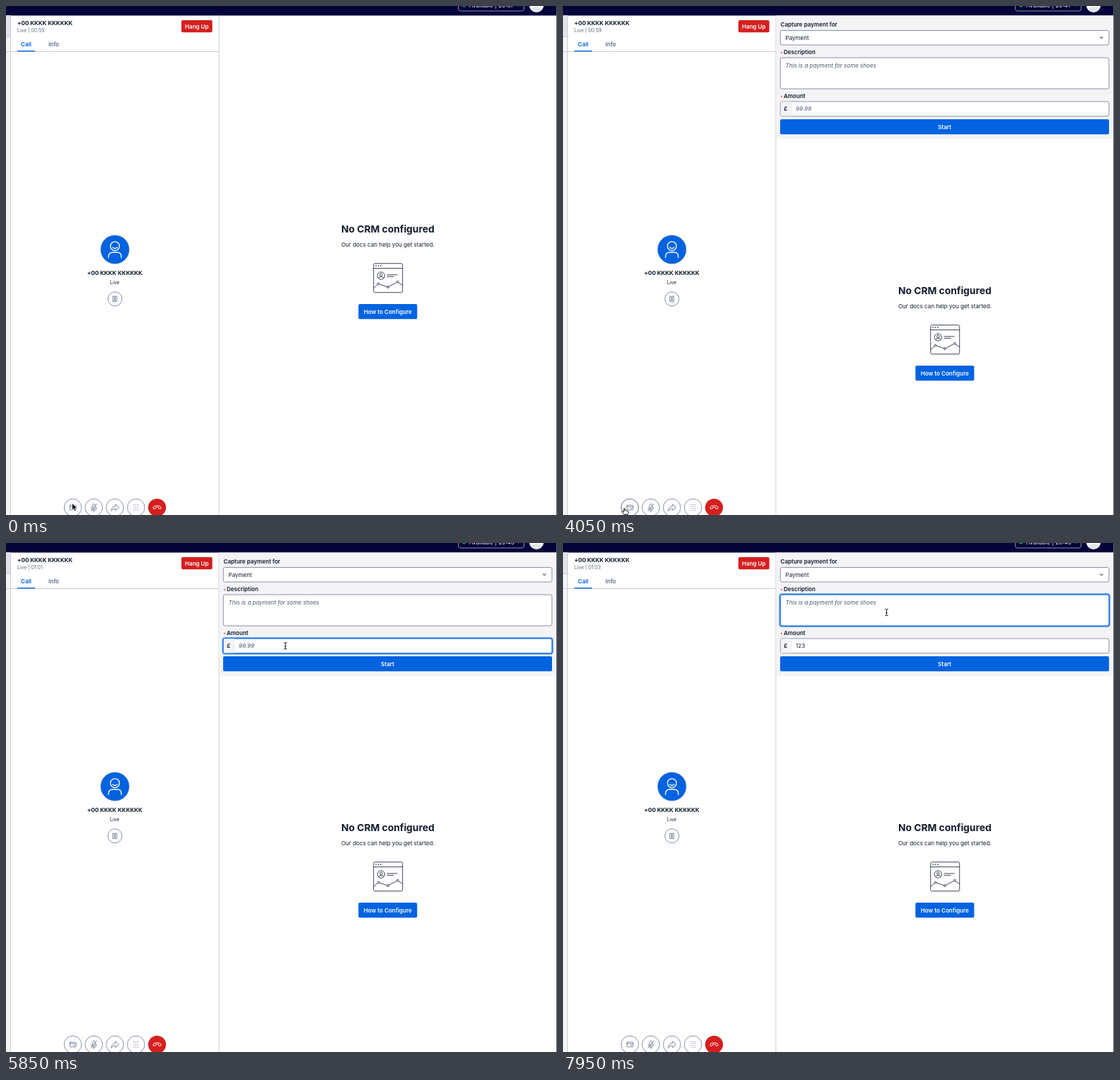
An HTML page that plays this animation: 779 by 719 pixels, repeating every 8000 ms.

```html
<!DOCTYPE html>
<html lang="en">
<head>
<meta charset="utf-8">
<title>Call payment form</title>
<style>
html, body { margin: 0; width: 100%; height: 100%; overflow: hidden; background: #fff; }
svg { display: block; width: 779px; height: 719px; }
text { font: 8.05px Inter, "Liberation Sans", sans-serif; fill: #121c2d; }
.b { font-weight: 600; }
.bb { font-weight: 700; }
.s { font-size: 6.9px; }
.w { fill: #fff; }
.m { text-anchor: middle; }
.ph { font-style: italic; fill: #4b5671; }
.line { stroke: #cacdd8; }
.ring { fill: #fff; stroke: #8891aa; }
.ico { fill: none; stroke: #606b85; stroke-width: .8; stroke-linecap: round; stroke-linejoin: round; }
.box { fill: #fff; stroke: #8891aa; }
.caret { stroke: #121c2d; stroke-width: .8; }
</style>
</head>
<body>
<svg viewBox="0 0 779 719">
  <rect width="779" height="719" fill="#fff"/>

  <!-- top bar -->
  <rect width="779" height="13.5" fill="#06033a"/>
  <rect x="639.5" y="-14" width="93" height="21" rx="3" fill="none" stroke="#8891aa"/>
  <circle cx="647.5" cy="-.8" r="2.4" fill="#14b053"/>
  <text id="status" class="w" x="655" y="1.7"></text>
  <path d="M722 -2l2.2 2.2 2.2-2.2" fill="none" stroke="#fff" stroke-width=".9"/>
  <circle cx="750" cy="-1.2" r="10.2" fill="#fff"/>
  <path d="M743 6q1-5 7-5t7 5q-7 5-14 0" fill="#e4e5ea"/>

  <!-- left strip and call panel -->
  <rect y="13.5" width="6.5" height="706" fill="#f4f4f6"/>
  <rect y="13.5" width="6.5" height="30" fill="#e1e3ea"/>
  <path class="line" d="M6.5 13.5V719M301 13.5V719M0 64.5H301M0 43.5H6"/>
  <text class="bb" x="16" y="27">+00 KKKK KKKKKK</text>
  <text id="call" class="s" x="16" y="36.7" style="fill:#606b85"></text>
  <rect x="248" y="20" width="43.7" height="17.3" rx="2" fill="#d61f1f"/>
  <text class="b w m" x="269.8" y="31.6">Hang Up</text>
  <text class="b m" x="28.5" y="56.8" style="fill:#0263e0">Call</text>
  <text class="b m" x="67.5" y="56.8" style="fill:#606b85">Info</text>
  <rect x="16" y="63" width="25" height="1.3" fill="#0263e0"/>

  <circle cx="154" cy="344" r="20" fill="#0263e0" stroke="#3a6fb8" stroke-width=".8"/>
  <g fill="none" stroke="#fff" stroke-width="1.3" stroke-linecap="round">
    <circle cx="154" cy="339.3" r="6.4"/>
    <path d="M150.8 341q3.2 3 6.4 0M145 355.5v-1.5q0-6 6-6h6q6 0 6 6v1.5"/>
  </g>
  <text class="bb m" x="153.8" y="380">+00 KKKK KKKKKK</text>
  <text class="s m" x="153.7" y="393.3">Live</text>
  <circle class="ring" cx="154" cy="413.8" r="10"/>
  <path class="ico" d="M151.3 410h1.8v7.6h-1.8zM154.9 410h1.8v7.6h-1.8z"/>

  <!-- call controls -->
  <circle id="pay" class="ring" cx="94.5" cy="708.5" r="12.3"/>
  <circle class="ring" cx="124.2" cy="708.5" r="12.3"/>
  <circle class="ring" cx="154" cy="708.5" r="12.3"/>
  <circle class="ring" cx="183.8" cy="708.5" r="12.3"/>
  <circle cx="213.6" cy="708.5" r="12.6" fill="#d61f1f"/>
  <g class="ico">
    <rect x="90.2" y="705.2" width="8.8" height="6.6" rx=".8"/>
    <path d="M90.2 707.3h8.8M95.5 709.8h2"/>
    <path d="M122.6 705.5q0-2.2 1.7-2.2t1.7 2.2v3q0 2.2-1.7 2.2t-1.7-2.2zM120.7 708q0 4.4 3.6 4.4t3.6-4.4M124.3 712.4v2M120.3 713.3l8-10"/>
    <path d="M148.8 713q.4-6.2 6-6.4v-2.8l5 4.5-5 4.5v-2.8q-4.200 0-6 3z"/>
  </g>
  <g id="dots" fill="#8891aa"></g>
  <path d="M208.200 709.500q-.8-1.800 1.200-2.800 4.200-2 8.400 0 2 1 1.200 2.800l-.5 1-2.700-.7-.4-1.700q-1.800-.5-3.600 0l-.4 1.700-2.700.7z" fill="none" stroke="#fff" stroke-width=".9" stroke-linejoin="round"/>

  <!-- empty CRM notice -->
  <g id="crm">
    <text class="bb m" x="539.8" y="320" style="font-size:13.8px">No CRM configured</text>
    <text class="m" x="539.8" y="340">Our docs can help you get started.</text>
    <g fill="none" stroke="#2b3448" stroke-width=".9" stroke-linejoin="round">
      <rect x="519.700" y="363.700" width="41" height="41" rx="2"/>
      <path d="M519.700 370.500h41M538.500 379.800h15M538.500 382.300h10"/>
      <path d="M522.400 367h1.500M525.700 367h1.500M529 367h1.500" stroke-width="1.400"/>
      <circle cx="530.300" cy="381" r="5.200"/>
      <circle cx="530.300" cy="379.700" r="1.800"/>
      <path d="M526.800 384.700q.5-2.300 3.500-2.300t3.500 2.300M519.700 398.500l5.500-5M527.700 393l11 3.600M541.300 396.300l11.200-6M555 390.700l5.700 3.800"/>
      <circle cx="526.400" cy="392.500" r="1.400"/>
      <circle cx="540" cy="397" r="1.400"/>
      <circle cx="553.800" cy="389.700" r="1.400"/>
    </g>
    <rect x="498.300" y="421" width="83" height="21.300" rx="2" fill="#0263e0"/>
    <text class="b w m" x="539.800" y="434.600">How to Configure</text>
  </g>

  <!-- payment form -->
  <g id="form">
    <rect x="301.500" y="13.500" width="477" height="174.500" fill="#f4f4f6"/>
    <text class="b" x="307.500" y="29.400">Capture payment for</text>
    <text class="b" x="312" y="68.200">Description</text>
    <text class="b" x="312" y="130.200">Amount</text>
    <circle cx="308.900" cy="65.700" r=".9" fill="#d61f1f"/>
    <circle cx="308.900" cy="127.700" r=".9" fill="#d61f1f"/>
    <g id="boxes"></g>
    <path d="M307.800 135.300h14.700v20h-14.700z" fill="#f4f4f6"/>
    <path d="M322.500 135.300v20" stroke="#e1e3ea" stroke-width=".6"/>
    <text class="b" x="312.200" y="148.200">£</text>
    <text x="314.500" y="47.600">Payment</text>
    <path d="M759 43.500l2.200 2.200 2.200-2.200" fill="none" stroke="#606b85" stroke-width="1.100"/>
    <text class="ph" x="314.500" y="86.700">This is a payment for some shoes</text>
    <text id="amount" x="329" y="148.300"></text>
    <path id="caret" class="caret"/>
    <rect x="307" y="160" width="465" height="21.300" rx="2" fill="#0263e0"/>
    <text class="b w m" x="539.500" y="173.500">Start</text>
  </g>

  <path d="M778.500 0V719" stroke="#5d6275"/>

  <!-- pointers -->
  <g id="arrow"><path d="M0 0v9.300l2.100-2 1.500 3.400 1.700-.7-1.500-3.300h3z" stroke="#fff" stroke-width=".6"/></g>
  <g id="hand"><path d="M-1.800 4.500l-2.300-3.200q-.7-1.300.5-1.500l1.600 1.200v-4.600q.9-1.200 1.700 0v2.800q1-.8 1.600.2 1.100-.6 1.600.4 1.300-.3 1.400.9v2l-.8 2.200z" fill="#fff" stroke="#000" stroke-width=".9" stroke-linejoin="round"/></g>
  <g id="beam"><path d="M-2.300-4.700q2.300 0 2.300 1.200q0-1.200 2.300-1.200M0-3.500v7M-2.300 4.700q2.300 0 2.300-1.200q0 1.200 2.300 1.200M-1.200.8h2.400" fill="none" stroke="#000" stroke-width=".9"/></g>
</svg>
<script>
const $ = id => document.getElementById(id);
const show = (el, on) => { el.style.display = on ? '' : 'none'; };

const LOOP = 8000, STEP = 150, SHIFT = 87;
const fields = [{ y: 34.5, h: 20.5 }, { y: 73, h: 44 }, { y: 135, h: 20.7 }];
const [, DESC, AMOUNT] = [0, 1, 2];

// time, x, y of the pointer
const path = [
  [0, 93.5, 702.5], [1800, 93.5, 702.5], [1950, 126.5, 531], [2100, 129, 529.5], [2850, 129, 529.5],
  [3000, 128.5, 528.8], [3300, 128.5, 528.8], [3450, 119, 595], [3600, 103, 670], [3750, 91, 706],
  [3900, 88, 713.7], [4200, 88, 713.7], [4350, 112, 668], [4650, 300, 330], [4800, 375, 180],
  [4950, 395, 145.3], [6750, 395, 145.3], [7050, 552.3, 47], [7200, 540, 56], [7350, 465, 94],
  [7500, 457.4, 98]
];

const make = (tag, parent, attrs) => {
  const el = document.createElementNS('http://www.w3.org/2000/svg', tag);
  for (const k in attrs) el.setAttribute(k, attrs[k]);
  return parent.appendChild(el);
};

for (const f of fields) {
  const shape = { x: 307.3, y: f.y, width: 464.6, height: f.h, rx: 2.3 };
  f.halo = make('rect', $('boxes'), { ...shape, fill: 'none', stroke: '#0263e0', 'stroke-opacity': .7, 'stroke-width': 3.6 });
  f.box = make('rect', $('boxes'), { ...shape, class: 'box' });
}
for (let i = 0; i < 12; i++)
  make('circle', $('dots'), { cx: 181 + i % 3 * 2.8, cy: 704.5 + (i / 3 | 0) * 2.7, r: .65 });

function pointer(t) {
  const i = path.findIndex(p => p[0] > t);
  if (i < 0) return path.at(-1).slice(1);
  const [a, b] = [path[i - 1], path[i]];
  const k = (t - a[0]) / (b[0] - a[0]);
  return [1, 2].map(n => a[n] + (b[n] - a[n]) * k);
}

const two = n => String(n).padStart(2, '0');
const clock = s => two(s / 60 | 0) + ':' + two(s % 60);

function draw(t) {
  const open = t >= 4050;
  $('status').textContent = 'Available | ' + clock(1237 + Math.floor((t + 750) / 1000));
  $('call').textContent = 'Live | ' + clock(55 + Math.floor((t + 350) / 1000));
  $('crm').setAttribute('transform', `translate(0 ${open ? SHIFT : 0})`);
  show($('form'), open);

  const [x, y] = pointer(t);
  const onPay = t > 3000 && Math.hypot(x - 94.5, y - 708.5) < 12.5;
  $('pay').style.fill = onPay && !open ? '#ebf4ff' : '#fff';
  $('pay').style.stroke = onPay ? '#606b85' : '';

  // form fields
  const focus = t < 5250 ? -1 : t < 7350 ? AMOUNT : DESC;
  const ringed = t >= 5400 && t !== 7350 ? focus : -1;
  let onField = false;
  fields.forEach((f, i) => {
    const over = open && x > 307 && y > f.y && y < f.y + f.h;
    onField ||= over;
    show(f.halo, i === ringed);
    f.box.style.stroke = i === ringed ? '#0263e0' : over || i === focus ? '#2a2a80' : '';
  });

  const typed = t < 6300 ? '' : t < 6450 ? '1' : '123';
  $('amount').textContent = typed || '99.99';
  $('amount').setAttribute('class', typed ? '' : 'ph');
  const caretOn = (t >= 5250 && t < 5850) || (t >= 6300 && t < 7050) || (t >= 7350 && t < 7950);
  show($('caret'), caretOn);
  $('caret').setAttribute('d', focus === DESC ? 'M314.5 79v10' : `M${329.5 + typed.length * 4.9} 140v10`);

  // pointer, hidden while typing
  const kind = onField ? 'beam' : onPay ? 'hand' : 'arrow';
  const typing = t >= 6300 && t < 6900;
  for (const id of ['arrow', 'hand', 'beam']) {
    show($(id), id === kind && !typing);
    $(id).setAttribute('transform', `translate(${x} ${y})`);
  }
}

function tick(now) {
  draw(Math.floor(now % LOOP / STEP) * STEP);
  requestAnimationFrame(tick);
}
draw(0);
requestAnimationFrame(tick);
</script>
</body>
</html>
```
